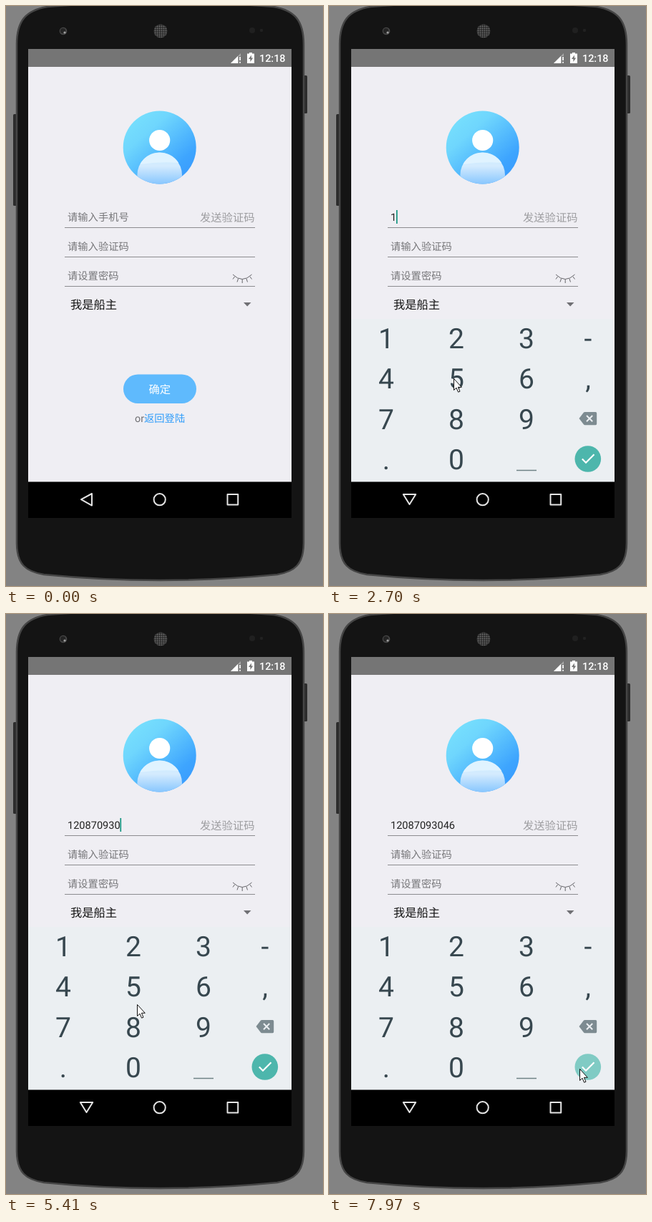
Write an HTML page that moves like this. It is 443x810 px and loops after 8 s.

```html
<!DOCTYPE html>
<html lang="zh">
<head>
<meta charset="utf-8">
<title>注册</title>
<style>
html, body { margin: 0; width: 100%; height: 100%; overflow: hidden; background: #838383; }
svg { display: block; width: 443px; height: 810px; text-rendering: geometricPrecision; }
.cjk { font-family: "Noto Sans CJK SC", "Noto Sans CJK", sans-serif; }
.num { font-family: Roboto, sans-serif; }
.hint { font-size: 14.3px; fill: #77777a; }
.key { font-size: 39px; fill: #37474f; text-anchor: middle; }
</style>
</head>
<body>
<svg viewBox="0 0 443 810">
  <defs>
    <linearGradient id="sky" x1="0.15" y1="0.1" x2="0.85" y2="0.9">
      <stop offset="0" stop-color="#76dffd"/><stop offset="0.25" stop-color="#6fd6fd"/>
      <stop offset="0.8" stop-color="#3ea5fe"/><stop offset="1" stop-color="#3a9cfe"/>
    </linearGradient>
    <linearGradient id="bust" x1="0" y1="0" x2="0" y2="1">
      <stop offset="0" stop-color="#c9ecfe"/><stop offset="0.3" stop-color="#d4ebfe"/>
      <stop offset="0.75" stop-color="#7fc2fe"/>
    </linearGradient>
    <clipPath id="disc"><circle cx="214.7" cy="197.5" r="51"/></clipPath>
    <clipPath id="screen"><rect x="31" y="60" width="368" height="605"/></clipPath>
    <pattern id="mesh" width="3" height="3" patternUnits="userSpaceOnUse">
      <rect width="3" height="3" fill="#2b2b2b"/><circle cx="1.5" cy="1.5" r="1" fill="#6c6c6c"/>
    </pattern>
  </defs>

  <rect width="443" height="810" fill="#838383"/>

  <!-- handset -->
  <rect x="10" y="151" width="6" height="128" rx="1.5" fill="#2c2c2c"/>
  <rect x="415" y="97" width="6" height="53" rx="1.5" fill="#2c2c2c"/>
  <path d="M15 54C15 20 28 6 58 1Q215-11 374 1C403 6 416 20 416 54V750C416 780 403 790 379 794Q215 810 53 794C28 790 15 780 15 750Z" fill="#141414" stroke="#454545" stroke-width="2.5"/>
  <circle cx="80" cy="35" r="5.300" fill="#484848"/>
  <circle cx="79.700" cy="34.700" r="3.800" fill="#242424"/>
  <circle cx="82" cy="37" r="1.600" fill="#a0a0a0"/>
  <circle cx="216" cy="35" r="9.500" fill="url(#mesh)"/>
  <circle cx="344" cy="34" r="4" fill="#202020"/>
  <circle cx="357" cy="34" r="2.300" fill="#212121"/>

  <!-- status bar -->
  <rect x="31" y="60" width="368" height="605" fill="#efeef3"/>
  <rect x="31" y="60" width="368" height="25" fill="#757575"/>
  <path d="M314 80L328 66V80Z" fill="#a9a9a9"/>
  <path d="M314 80L324 70V80Z" fill="#fff"/>
  <path d="M325 70h4v11h-4z" fill="#757575"/>
  <path d="M326.2 71h1.7v5h-1.7zM326.2 77.8h1.7v2h-1.7z" fill="#fff"/>
  <path d="M340 65h4v1.500h3V80H337V66.500h3z" fill="#fff"/>
  <path d="M343 68.500L339 74h2.400v4l3.800-5.600h-2.400z" fill="#757575"/>
  <text class="num" x="354" y="78" font-size="14.4" font-weight="500" fill="#fff">12:18</text>

  <!-- portrait icon -->
  <g clip-path="url(#disc)">
    <rect x="163" y="146" width="104" height="104" fill="url(#sky)"/>
    <circle cx="214.700" cy="236" r="31.300" fill="url(#bust)"/>
    <path d="M187.200 221A31.300 31.300 0 0 1 241.200 219Q215 217 187.200 221Z" fill="#e6f6ff" opacity=".75"/>
  </g>
  <circle cx="214.700" cy="187.500" r="14.600" fill="#fff"/>

  <!-- form -->
  <g class="cjk">
    <text id="hint" class="hint" x="86" y="300">请输入手机号</text>
    <text class="hint" x="86" y="341">请输入验证码</text>
    <text class="hint" x="86" y="382">请设置密码</text>
    <text x="271" y="301" font-size="15.3" fill="#9d9da0">发送验证码</text>
    <text x="90" y="423" font-size="16.3" fill="#151515">我是船主</text>
  </g>
  <path d="M82 309.500H348M82 350.500H348M82 391.500H348" stroke="#8c8c8f"/>
  <path d="M317 375Q330 388 343.500 375M319.500 378l-2.500 3.500M324.500 381l-1.500 4.500M330.200 382v5M336 381l1.500 4.500M341 378l2.500 3.500" fill="none" stroke="#66666a"/>
  <path d="M332 414H342.500L337.200 419.500Z" fill="#707074"/>
  <text id="phone" class="num" x="86" y="300" font-size="14.57" fill="#222"></text>
  <rect id="caret" y="285" width="1.7" height="19" fill="#12947f"/>
  <rect x="164" y="514.500" width="102" height="40.500" rx="20.250" fill="#5fbafd"/>
  <text class="cjk" x="199.500" y="541" font-size="15.3" font-weight="500" fill="#fff">确定</text>
  <text x="180" y="581" font-size="14.3" fill="#6f6f73"><tspan class="num">or</tspan><tspan class="cjk" x="193" fill="#309dfa">返回登陆</tspan></text>

  <!-- keyboard -->
  <g clip-path="url(#screen)">
    <g id="board">
      <rect x="31" y="437" width="368" height="228" fill="#ebeff2"/>
      <rect id="glow" width="92" height="42.500" rx="1" fill="#d0d5d8"/>
      <g id="keys" class="num"></g>
      <path d="M262 648.500H290" stroke="#6e8285" stroke-width="1.500"/>
      <path d="M349.500 576L356 567.500Q356.700 567 357.500 567H372.500Q374.200 567 374.200 568.700V583.500Q374.200 585.200 372.500 585.200H357.500Q356.700 585.200 356 584.500Z" fill="#7d8b91"/>
      <path d="M360 572l8.200 8.200M368.200 572L360 580.200" stroke="#ebeff2" stroke-width="2"/>
      <circle id="done" cx="361.800" cy="632.500" r="18.300"/>
      <path d="M353.800 632.500l5.200 5.200L370.500 626.200" fill="none" stroke="#fff" stroke-width="2.200"/>
    </g>
  </g>

  <!-- navigation bar -->
  <rect x="31" y="664.500" width="368" height="50.500" fill="#000"/>
  <g fill="none" stroke="#e4e4e4" stroke-width="2" stroke-linejoin="round">
    <path id="back"/>
    <circle cx="214.700" cy="689.200" r="8.100"/>
    <rect x="309.500" y="682" width="14.700" height="14.400"/>
  </g>

  <path id="mouse" d="M.5.500V16.500L4 13.200 6.600 19.200 9 18.200 6.400 12.300H11.300Z" fill="#fff" stroke="#111"/>
</svg>
<script>
const LOOP = 8000, NUMBER = "12087093046";
const FOCUS = 1020, BOARD = 1050, CHECK = 7900; // field focused, keyboard rises, tick pressed
const HOLD = 90, GLIDE = 280; // length of a key press and of a move between keys
const $ = id => document.getElementById(id);
const clamp = u => Math.min(1, Math.max(0, u));
const easeOut = u => 1 - (1 - clamp(u)) ** 3;

// when each key goes down, and its cell in the 3 by 3 digit block
const cells = "0440123456788";
const presses = [2370, 2790, 3000, 3560, 3880, 4230, 4577, 5010, 5270, 5640, 5970, 6500, 7170]
  .map((at, i) => ({ at, end: at + HOLD, col: cells[i] % 3, row: Math.floor(cells[i] / 3) }));
const typed = presses.slice(0, NUMBER.length).map(p => p.end);

// pointer: into the field, from key to key as each is released, then to the tick
const START = { x: 306, y: 629 };
const moves = [
  { at: 70, time: 770, x: 134, y: 297 },
  ...presses.map((p, i) => ({
    at: i ? presses[i - 1].end : 1800, time: GLIDE, x: 82 + 92 * p.col, y: 465 + 55 * p.row
  })),
  { at: presses.at(-1).end, time: 600, x: 350, y: 635 }
];

function pointer(t) {
  let { x, y } = START;
  for (const m of moves) {
    const u = easeOut((t - m.at) / m.time);
    x += (m.x - x) * u;
    y += (m.y - y) * u;
  }
  return [x, y].map(Math.round);
}

["123-", "456,", "789", ".0"].forEach((row, r) => [...row].forEach((ch, c) => {
  const key = document.createElementNS("http://www.w3.org/2000/svg", "text");
  set(key, { class: "key", x: c < 3 ? 80 + 98 * c : 362, y: 478 + 56.25 * r });
  key.textContent = ch;
  $("keys").append(key);
}));

function set(el, attrs) {
  for (const k in attrs) el.setAttribute(k, attrs[k]);
}
const show = (id, on) => set($(id), { visibility: on ? "visible" : "hidden" });

function draw(t) {
  show("mouse", t >= moves[0].at);
  set($("mouse"), { transform: `translate(${pointer(t)})` });

  const n = typed.filter(at => at <= t).length;
  $("phone").textContent = NUMBER.slice(0, n);
  show("hint", !n);

  // blinking restarts after every digit
  const since = t - (n ? typed[n - 1] : FOCUS);
  show("caret", t >= FOCUS && since % 1000 < 500);
  set($("caret"), { x: 85.8 + 8.18 * n });

  const u = (t - BOARD) / 250;
  show("board", u > 0);
  set($("board"), { transform: `translate(0 ${46 * (1 - easeOut(u))})`, opacity: clamp(u) });

  const hit = presses.find(p => t >= p.at && t < p.end);
  set($("glow"), hit
    ? { x: 34 + 98 * hit.col, y: 442.7 + 56.1 * hit.row, opacity: 1 }
    : { opacity: 0 });
  set($("done"), { fill: t >= CHECK ? "#80cbc4" : "#4db6ac" });
  set($("back"), { d: t < BOARD ? "M120 681V697.500L105 689.200Z" : "M103.800 682H121.200L112.500 696Z" });
}

const start = performance.now();
function tick() {
  draw((performance.now() - start) % LOOP);
  requestAnimationFrame(tick);
}
tick();
</script>
</body>
</html>
```
